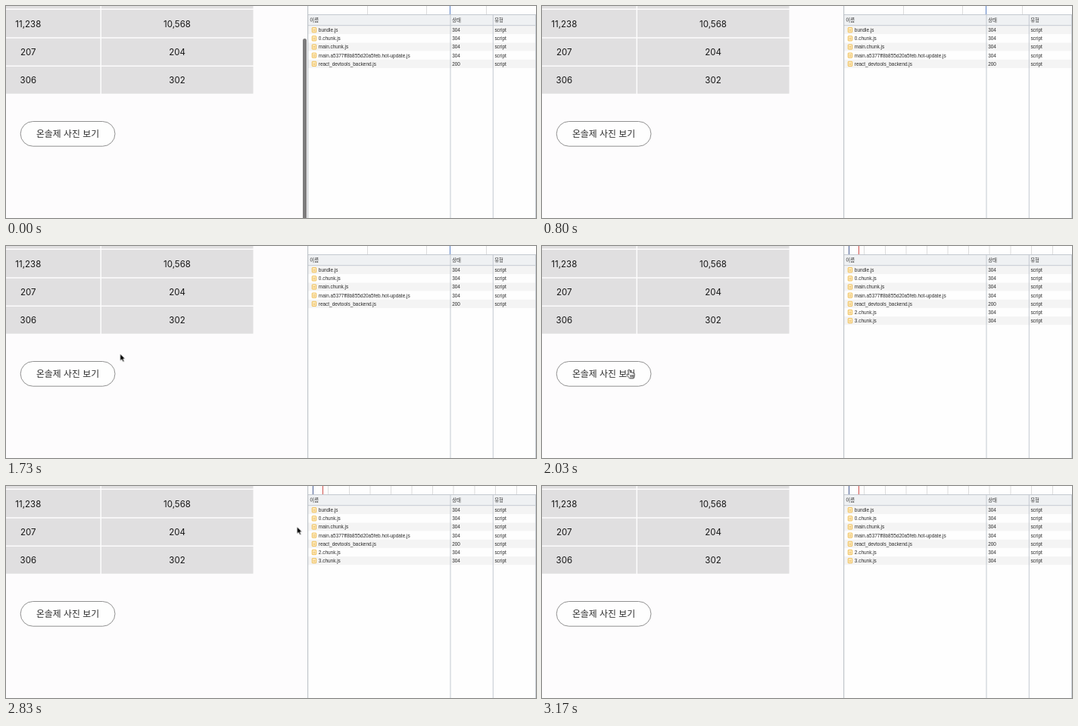
Animation, 700 px wide and 280 px high, one loop 3.93 s. Source, as an HTML page:

```html
<!DOCTYPE html>
<html lang="ko">
<head>
<meta charset="utf-8">
<title>Chunk preloading on hover</title>
<style>
html, body { margin: 0; height: 100%; overflow: hidden; background: #fdfcfd; }
svg { display: block; width: 700px; height: 280px; }
.num { font: 11.5px Inter, sans-serif; text-anchor: middle; fill: #161616; }
.btn { font: 300 11.9px "Noto Sans CJK KR", "Noto Sans CJK", sans-serif; text-anchor: middle; fill: #2c2c2c; }
.head { font: 6.4px "Noto Sans CJK KR", "Noto Sans CJK", sans-serif; fill: #333; }
.log { font: 6.45px "Liberation Sans", Arial, sans-serif; fill: #2b2b2b; }

#bar, #cursor, #arrow, #hand, .before, .after { animation: 3930ms infinite; }
#bar { animation-name: fade; animation-timing-function: linear; }
#cursor { animation-name: move; animation-timing-function: linear; }
#arrow, #hand, .before, .after { animation-timing-function: step-end; }
#arrow { animation-name: arrow; }
#hand { animation-name: hand; }
.before { animation-name: before; }
.after { animation-name: after; }

@keyframes fade {
  0%, 13.2% { opacity: 1; }
  13.4% { opacity: .82; }
  19%, 100% { opacity: 0; }
}
@keyframes move {
  0%, 26% { transform: translate(470px, -20px); }
  26.2% { transform: translate(455px, 10px); }
  27.2% { transform: translate(405px, 32px); }
  28.2% { transform: translate(355px, 78px); }
  29.77% { transform: translate(307px, 111px); }
  33% { transform: translate(268px, 121px); }
  39.95% { transform: translate(206px, 130px); }
  44% { transform: translate(151px, 142px); }
  47% { transform: translate(127px, 155px); }
  51.65% { transform: translate(115.5px, 163px); }
  53.4%, 54.2% { transform: translate(114px, 165.5px); }
  57.8%, 66.1% { transform: translate(112px, 167px); }
  68% { transform: translate(142px, 154px); }
  70% { transform: translate(268px, 101px); }
  72% { transform: translate(384px, 54px); }
  74% { transform: translate(400px, 34px); }
  78.9% { transform: translate(410px, 10px); }
  79.7% { transform: translate(498px, 0); }
  80.6%, 100% { transform: translate(510px, -20px); }
}
@keyframes arrow {
  0%, 68%, 100% { visibility: visible; }
  45% { visibility: hidden; }
}
@keyframes hand {
  0%, 68%, 100% { visibility: hidden; }
  45% { visibility: visible; }
}
@keyframes before {
  0% { visibility: visible; }
  48.4%, 100% { visibility: hidden; }
}
@keyframes after {
  0% { visibility: hidden; }
  48.4%, 100% { visibility: visible; }
}
</style>
</head>
<body>
<svg viewBox="0 0 700 280">
  <rect width="700" height="280" fill="#fdfcfd"/>

  <path fill="#e0dfe0" d="M0 0H124.5V3.5H0zM126 0H326.5V3.5H126zM0 5H124.5V41.3H0zM126 5H326.5V41.3H126zM0 42.8H124.5V78.6H0zM126 42.8H326.5V78.6H126zM0 80.1H124.5V115.7H0zM126 80.1H326.5V115.7H126z"/>
  <g class="num">
    <text x="29.3" y="27.5">11,238</text><text x="226" y="27.5">10,568</text>
    <text x="29.3" y="65">207</text><text x="226" y="65">204</text>
    <text x="29.3" y="102.3">306</text><text x="226" y="102.3">302</text>
  </g>
  <rect x="19.2" y="152.5" width="124.8" height="32.7" rx="16.35" fill="#fefefe" stroke="#777" stroke-width=".8"/>
  <text class="btn" x="81.5" y="172.7">온솔제 사진 보기</text>
  <rect id="bar" x="392" y="43" width="5" height="245" rx="2.5" fill="#7d7c7d"/>

  <rect x="398.5" width="301.5" height="280" fill="#fefefe"/>
  <g stroke-width="1" fill="none">
    <path class="before" stroke="#dcdcdc" d="M477.5 0V11M555.5 0V11M634.5 0V11"/>
    <path class="before" stroke="#5c82c4" d="M586.5 0V11"/>
    <path class="after" stroke="#dcdcdc" d="M425.5 0V11M453.5 0V11M481 0V11M508.5 0V11M536 0V11M563.5 0V11M591 0V11M619 0V11M646.5 0V11M674.5 0V11" stroke-dasharray="none"/>
    <path class="after" stroke="#4a5f94" d="M405.5 0V11"/>
    <path class="after" stroke="#d0524e" d="M418.5 0V11"/>
  </g>
  <rect x="399" y="11.5" width="301" height="14" fill="#eff1f3"/>
  <g id="rows"></g>
  <path fill="none" stroke="#c3c9d0" d="M399 11.5H700M399 25.7H700M587 12V280M643.3 12V280M699.6 12V280"/>
  <path stroke="#b4bac1" d="M398.7 0V280"/>
  <g class="head">
    <text x="401.3" y="21.2">이름</text><text x="589.2" y="21.2">상태</text><text x="645.2" y="21.2">유형</text>
  </g>

  <g id="cursor">
    <path id="arrow" d="M0 0V9.6L2.2 7.6 3.8 11 5.5 10.2 4 6.9H6.8z" fill="#000" stroke="#fff" stroke-width=".8" stroke-linejoin="round"/>
    <g id="hand" stroke="#111" stroke-width=".85" stroke-linejoin="round" stroke-linecap="round">
      <path fill="#fff" d="M-1 6.8L-1.7 1.4Q-1.5 0-.3.3L.7 1 1.4 4.1Q2.6 3.2 3.3 4.4 4.6 3.8 5.1 5 6.6 4.6 6.7 6.2L6.4 9 5.5 11.8H.2L-3.5 7.4Q-3.6 6-2.4 6.1z"/>
      <path fill="none" d="M1.5 7.6V10M3.2 7.5V10M4.8 7.4V10"/>
    </g>
  </g>
</svg>
<script>
const files = ['bundle.js', '0.chunk.js', 'main.chunk.js', 'main.a5377ff8b855d20a5feb.hot-update.js',
  'react_devtools_backend.js', '2.chunk.js', '3.chunk.js'];
const PITCH = 11.17;

const row = (name, i) => {
  const status = name.startsWith('react') ? 200 : 304;
  return `<g class="log ${i > 4 ? 'after' : ''}" transform="translate(399 ${26.1 + i * PITCH})">
    <rect width="301" height="${PITCH}" fill="${i % 2 ? '#fefefe' : '#f4f4f4'}"/>
    <rect x="5.3" y="2.5" width="5.4" height="6.2" rx=".5" fill="#fff3d2" stroke="#eeb744" stroke-width=".9"/>
    <path d="M6.7 5H9.3M6.7 6.7H9.3" stroke="#e9a93a" stroke-width=".8"/>
    <text x="13.8" y="7.9">${name}</text>
    <text x="190.2" y="7.9">${status}</text>
    <text x="246.4" y="7.9">script</text>
  </g>`;
};

document.getElementById('rows').innerHTML = files.map(row).join('');
</script>
</body>
</html>
```
